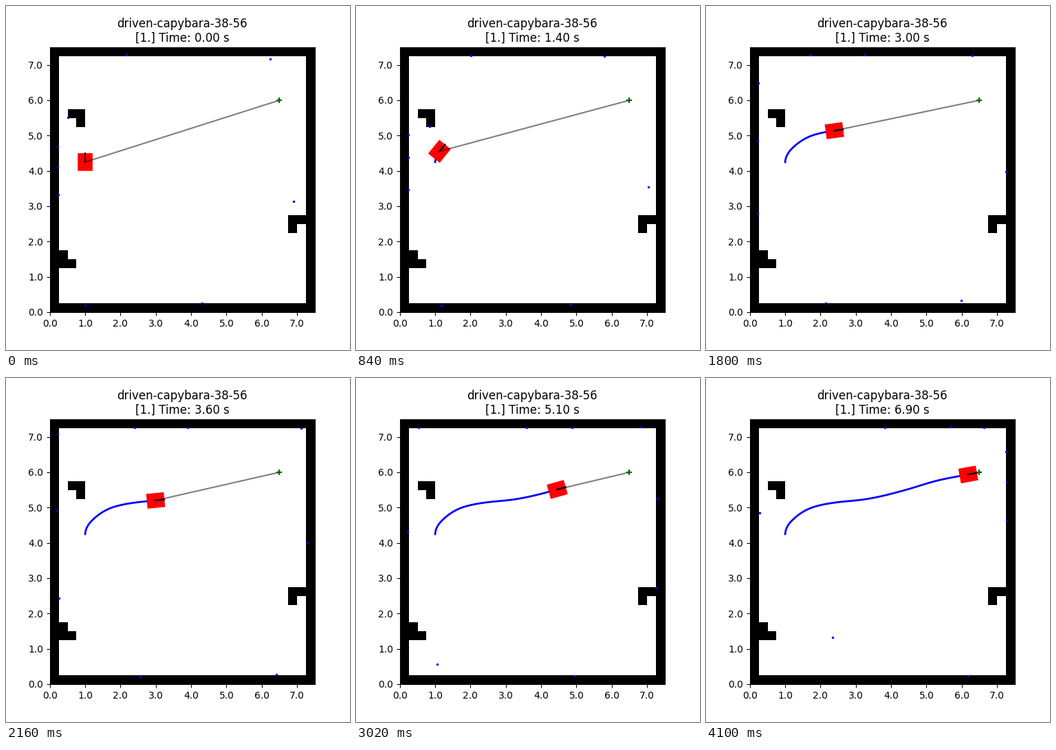
Animation, 500 px wide and 500 px high, one loop 4120 ms. Source, as a matplotlib script:

```python
import numpy as np
import matplotlib.pyplot as plt
from matplotlib.animation import FuncAnimation
from matplotlib.patches import Rectangle
from matplotlib.transforms import Affine2D

SIZE, CELL = 7.5, 0.25
GOAL = (6.5, 6.0)
LENGTH, WIDTH = 0.5, 0.42
MAX_RANGE, RAY_STEP = 6.0, 0.05
STEPS = 70          # simulation steps of 0.1 s
TICK = 20           # ms

# Way points of the drive: seconds, x, y, heading in degrees
START = 0.35
KEY_POSES = np.array([
    (START, 1.0, 4.25, 90),
    (1.4, 1.122, 4.554, 51),
    (2.4, 1.807, 5.017, 17.2),
    (3.6, 2.995, 5.202, 5.5),
    (5.1, 4.456, 5.513, 15.75),
    (6.1, 5.421, 5.791, 12.3),
    (6.9, 6.185, 5.937, 10.4),
])


def speed(t):
    """Even acceleration to full speed, then braking near the goal."""
    return np.clip((t - START) / 1.9, 0, 1) - 0.5 * np.clip(t - 6.6, 0, None)


def direction(angle):
    return np.array([np.cos(angle), np.sin(angle)])


def pose(t):
    """Position and heading on a cubic Hermite curve through the way points."""
    t = max(t, START + 0.001)
    times = KEY_POSES[:, 0]
    k = min(np.searchsorted(times, t, side="right"), len(times) - 1)
    (t0, *p0, a0), (t1, *p1, a1) = KEY_POSES[k - 1:k + 1]
    span = t1 - t0
    u = (t - t0) / span
    p0, gap = np.array(p0), np.subtract(p1, p0)
    m0 = span * speed(t0) * direction(np.radians(a0))
    m1 = span * speed(t1) * direction(np.radians(a1))
    c2, c3 = 3 * gap - 2 * m0 - m1, m0 + m1 - 2 * gap
    x, y = p0 + u * (m0 + u * (c2 + u * c3))
    dx, dy = m0 + u * (2 * c2 + 3 * u * c3)
    return x, y, np.arctan2(dy, dx)


def build_grid():
    """Walls around the room and three L-shaped blocks of 2 by 2 cells."""
    n = int(SIZE / CELL)
    grid = np.ones((n, n))
    grid[1:-1, 1:-1] = 0
    for row, col, gap in [(21, 2, (0, 0)), (9, 27, (0, 1)), (5, 1, (1, 1))]:
        block = grid[row:row + 2, col:col + 2]
        block[:] = 1
        block[gap] = 0
    return grid


def scan(x, y, theta):
    """March each beam until it enters an occupied cell."""
    r = RAY_STEP * np.arange(1, round(MAX_RANGE / RAY_STEP) + 1)
    hits = []
    for beam in BEAMS:
        px = x + r * np.cos(theta + beam)
        py = y + r * np.sin(theta + beam)
        col = np.clip(np.floor(px / CELL).astype(int), 0, GRID.shape[1] - 1)
        row = np.clip(np.floor(py / CELL).astype(int), 0, GRID.shape[0] - 1)
        blocked = GRID[row, col] > 0
        k = blocked.argmax() if blocked.any() else -1
        hits.append((px[k], py[k]))
    return np.array(hits).T


# One beam straight back, the others mirrored on both sides
side = 180 - 39.75 * np.arange(1, 5)
BEAMS = np.radians(np.concatenate([[180], side, -side]))
GRID = build_grid()
POSES = np.array([pose(0.1 * i) for i in range(STEPS)])

fig, ax = plt.subplots(figsize=(5, 5), dpi=100)
ax.imshow(GRID, cmap="gray_r", origin="lower", extent=(0, SIZE, 0, SIZE),
          interpolation="nearest")
ax.set_xticks(range(8))
ax.set_yticks(range(8))
ax.xaxis.set_major_formatter("{x:.1f}")
ax.yaxis.set_major_formatter("{x:.1f}")
title = ax.set_title("")

trail, = ax.plot([], [], color="blue", lw=2, zorder=2)
body = ax.add_patch(Rectangle((-LENGTH / 2, -WIDTH / 2), LENGTH, WIDTH,
                              color="red", lw=0, zorder=3))
nose, = ax.plot([], [], color="black", lw=1.5, zorder=4)
aim, = ax.plot([], [], color="black", alpha=0.5, lw=1.5, zorder=4)
ax.plot(*GOAL, "+", color="darkgreen", ms=6, mew=1.5, zorder=5)
dots, = ax.plot([], [], ".", color="blue", ms=3, zorder=5)
ax.set(xlim=(0, SIZE), ylim=(0, SIZE))


def update(tick):
    # Steps alternate between one tick and five ticks on screen
    i = 2 * (tick // 6) + (tick % 6 > 0)
    x, y, theta = POSES[i]
    tip = (x, y) + LENGTH / 2 * direction(theta)
    title.set_text(f"driven-capybara-38-56\n[1.] Time: {i / 10:.2f} s")
    trail.set_data(POSES[:i + 1, 0], POSES[:i + 1, 1])
    body.set_transform(Affine2D().rotate(theta).translate(x, y) + ax.transData)
    nose.set_data([x, tip[0]], [y, tip[1]])
    aim.set_data([x, GOAL[0]], [y, GOAL[1]])
    dots.set_data(*scan(x, y, theta))
    return title, trail, body, nose, aim, dots


anim = FuncAnimation(fig, update, frames=206, interval=TICK, repeat=True,
                     cache_frame_data=False)
plt.show()
```
